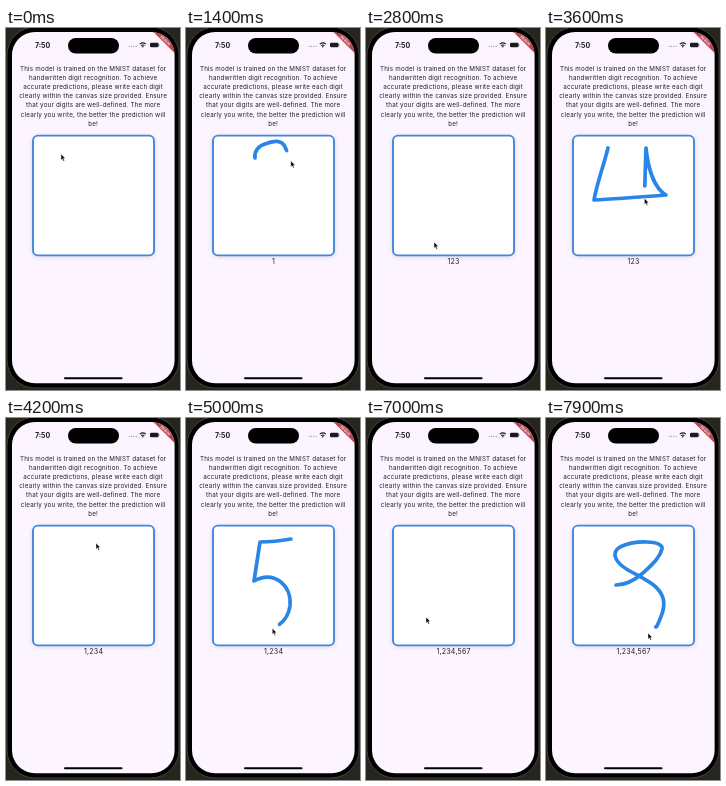
An HTML page for the animation above (8 s loop, 174 px wide and 362 px high).

```html
<!DOCTYPE html>
<html lang="en">
<head>
<meta charset="utf-8">
<title>Digit recognition</title>
<style>
  html, body { margin: 0; width: 100%; height: 100%; overflow: hidden; background: #26261e; }
  svg { display: block; width: 100vw; height: 100vh; }
  text { font-family: Inter, Roboto, sans-serif; fill: #211d26; text-anchor: middle; }
  #intro text { font-size: 6.25px; letter-spacing: .2px; }
  #result { font-size: 7.1px; letter-spacing: .2px; }
  #ink { fill: none; stroke: #2a85e8; stroke-width: 3.7; stroke-linecap: round; stroke-linejoin: round; }
</style>
</head>
<body>
<svg viewBox="0 0 174 362">
  <defs>
    <clipPath id="screen"><rect x="6" y="4" width="162.6" height="351.2" rx="23"/></clipPath>
    <filter id="blur" x="-20%" y="-20%" width="140%" height="140%"><feGaussianBlur stdDeviation="2"/></filter>
  </defs>
  <rect x="1" y="-1" width="172" height="361" rx="28" stroke="#44423f"/>
  <g clip-path="url(#screen)">
    <rect width="174" height="362" fill="#fcf5ff"/>
    <g transform="translate(159.5 12.5) rotate(45)">
      <rect x="-25" y="-2.5" width="50" height="5" fill="#b02832" opacity=".85"/>
      <text y="1.4" font-size="3.7" font-weight="700" style="fill:#f3dfe2">DEBUG</text>
    </g>
  </g>
  <rect x="62" y="10" width="51" height="15.5" rx="7.75"/>
  <text x="36.5" y="19.6" font-size="7" font-weight="700">7:50</text>
  <g fill="#1c1a20">
    <path d="M123.3 18.3h7.5" stroke="#777" stroke-width="1.1" stroke-linecap="round" stroke-dasharray="0 2.3"/>
    <g fill="none" stroke="#1c1a20" stroke-width="1.1">
      <path d="M133.8 16.2q3-2.6 6 0M135.1 17.7q1.7-1.4 3.4 0"/>
    </g>
    <path d="M135.8 18.5q1-.8 2 0l-1 1.2z"/>
    <rect x="144" y="14.7" width="8.6" height="4.6" rx="1.3"/>
    <rect x="153" y="16.2" width=".7" height="1.6" rx=".3" fill="#888"/>
    <rect x="58" y="349.2" width="58.5" height="2" rx="1" fill="#000"/>
  </g>
  <g id="intro"></g>
  <rect x="26" y="108" width="123" height="121" rx="6" fill="#8e8aa5" opacity=".3" filter="url(#blur)"/>
  <rect x="27" y="107.6" width="121" height="119.8" rx="5" fill="#fff" stroke="#4087de" stroke-width="1.9"/>
  <path id="ink"/>
  <text id="result" x="87.6" y="235.7"></text>
  <path id="cursor" d="M0 0v6.2l1.4-1.3 1 2.3 1.1-.5-1-2.2h1.9z" fill="#000" stroke="#fff" stroke-width=".5"/>
</svg>
<script>
const LOOP = 8000, STEP = 100, LAG = 30, HOLD = 100;
const NS = 'http://www.w3.org/2000/svg';
const $ = id => document.getElementById(id);

['This model is trained on the MNIST dataset for',
 'handwritten digit recognition. To achieve',
 'accurate predictions, please write each digit',
 'clearly within the canvas size provided. Ensure',
 'that your digits are well-defined. The more',
 'clearly you write, the better the prediction will',
 'be!'].forEach((line, i) => {
  const el = document.createElementNS(NS, 'text');
  el.setAttribute('x', 87.2);
  el.setAttribute('y', 42.8 + i * 9.15);
  el.textContent = line;
  $('intro').append(el);
});

// [start, end, cleared at, path]; entries without a clear time only place the cursor
const strokes = [
  [0, 0, 0, 'M55 126h0'],
  [350, 740, 850, 'M88 121C87 150 86 180 86 207'],
  [1250, 1740, 1780, 'M69 130C68 124 72 118 79 116C88 112 96 112 99 119L104 130C112 155 88 180 73 204C90 200 106 206 121 205'],
  [2050, 2700, 2780, 'M60 128C80 108 115 113 113 135C111 153 94 160 80 161C108 158 128 172 118 194C110 212 88 218 68 214'],
  [3050, 3700, 3800, 'M62 120C57 140 51 155 48 172C70 171 95 169 120 167C108 160 102 140 100 120C99 150 98 185 97 212'],
  [4200, 4200, 0, 'M90 125h0'],
  [4450, 5080, 5150, 'M105 121C94 123 84 124 74 124C72 137 70 150 68 163C88 152 106 167 104 188C101 208 82 216 64 210'],
  [5350, 5860, 6000, 'M83 211C78 214 70 213 65 208C62 200 68 182 84 182C98 182 102 194 102 204C102 216 94 222 84 222C72 222 60 204 60 182C60 164 76 130 102 125'],
  [6450, 6950, 6990, 'M36 136C60 129 90 130 115 129C95 150 72 175 60 199'],
  [7250, 7900, Infinity, 'M70 167C80 167 90 161 97 155C108 145 114 139 116 131C118 122 88 122 74 129C64 135 70 145 82 152C98 161 113 167 117 180C120 190 114 201 111 208L102 215']
].map(([start, end, clear, d]) => {
  const path = document.createElementNS(NS, 'path');
  path.setAttribute('d', d);
  return { start, end, clear, d, path, length: path.getTotalLength() };
});

const clamp = v => Math.max(0, Math.min(1, v));
const smooth = v => v * v * (3 - 2 * v);
const drawn = (s, t) => s.length * clamp((t - s.start) / (s.end - s.start || 1));

function cursorAt(t) {
  const i = strokes.findLastIndex(s => s.start <= t);
  const s = strokes[i], next = strokes[i + 1];
  const a = s.path.getPointAtLength(drawn(s, t));
  if (t <= s.end + HOLD || !next) return a;
  const b = next.path.getPointAtLength(0);
  const from = s.end + HOLD;
  const k = smooth(clamp((t - from) / (next.start - from)));
  return { x: a.x + (b.x - a.x) * k, y: a.y + (b.y - a.y) * k };
}

function render(t) {
  const active = strokes.find(s => s.clear && t - LAG > s.start && t < s.clear);
  $('ink').setAttribute('d', active ? active.d : '');
  if (active) $('ink').setAttribute('stroke-dasharray', `${drawn(active, t - LAG)} 999`);
  const count = strokes.filter(s => s.clear && s.clear <= t).length;
  $('result').textContent = count ? Number('1234567'.slice(0, count)).toLocaleString('en-US') : '';
  const p = cursorAt(t);
  $('cursor').setAttribute('transform', `translate(${p.x} ${p.y})`);
}

function tick() {
  const t = performance.now() % LOOP;
  render(Math.floor(t / STEP) * STEP);
  requestAnimationFrame(tick);
}
tick();
</script>
</body>
</html>
```
